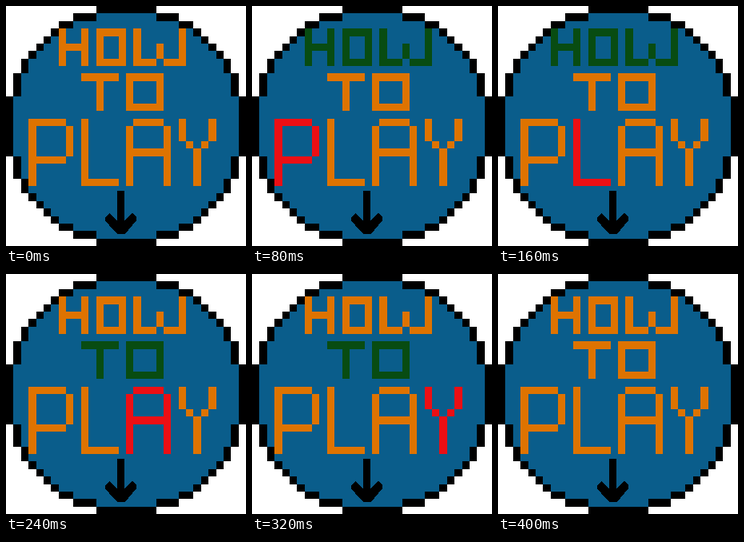
Recreate the animation shown at these times as an HTML page. Size 300 by 300 pixels, loop 480 ms.

```html
<!DOCTYPE html>
<html lang="en">
<head>
<meta charset="utf-8">
<title>How to play</title>
<style>
  html, body { margin: 0; height: 100%; overflow: hidden; background: #fff; }
  svg { display: block; width: 100vw; height: 100vh; shape-rendering: crispEdges; }
  .ink { fill: none; stroke-width: 1; stroke-linecap: square; stroke-linejoin: miter; }
  .ink path { stroke: #de7300; animation: 480ms step-end infinite; }
  .ink .how { animation-name: how; }
  .ink .to { animation-name: to; }
  .ink .p { animation-name: p; }
  .ink .l { animation-name: l; }
  .ink .a { animation-name: a; }
  .ink .y { animation-name: y; }
  @keyframes how { 16.6667% { stroke: #084c12; } 50% { stroke: #de7300; } }
  @keyframes to { 50% { stroke: #084c12; } 83.3333% { stroke: #de7300; } }
  @keyframes p { 16.6667% { stroke: #ec0f14; } 33.3333% { stroke: #de7300; } }
  @keyframes l { 33.3333% { stroke: #ec0f14; } 50% { stroke: #de7300; } }
  @keyframes a { 50% { stroke: #ec0f14; } 66.6667% { stroke: #de7300; } }
  @keyframes y { 66.6667% { stroke: #ec0f14; } 83.3333% { stroke: #de7300; } }
</style>
</head>
<body>
<svg viewBox="0 0 300 300" role="img" aria-label="How to play">
  <g transform="scale(9.375)">
    <!-- stepped disc: rim, then face -->
    <path d="M12 0H20V1H23V2H25V3H26V4H27V5H28V6H29V7H30V9H31V12H32V20H31V23H30V25H29V26H28V27H27V28H26V29H25V30H23V31H20V32H12V31H9V30H7V29H6V28H5V27H4V26H3V25H2V23H1V20H0V12H1V9H2V7H3V6H4V5H5V4H6V3H7V2H9V1H12Z"/>
    <path fill="#0a5d8b" d="M12 1H20V2H23V3H25V4H26V5H27V6H28V7H29V9H30V12H31V20H30V23H29V25H28V26H27V27H26V28H25V29H23V30H20V31H12V30H9V29H7V28H6V27H5V26H4V25H3V23H2V20H1V12H2V9H3V7H4V6H5V5H6V4H7V3H9V2H12Z"/>
    <!-- letters, stroked through cell centres -->
    <g class="ink" transform="translate(.5 .5)">
      <path class="how" d="M7 3V7M10 3V7M7 5H10M12 3H15V7H12ZM17 3V7H19M20 5V6M21 7H23V3"/>
      <path class="to" d="M10 9H14M12 9V13M16 9H20V13H16Z"/>
      <path class="p" d="M3 23V15H7M8 16V19M3 20H7"/>
      <path class="l" d="M10 15V23H14"/>
      <path class="a" d="M17 15H20M16 16V23M21 16V23M16 19H21"/>
      <path class="y" d="M23 15V17M27 15V17M24 18h0M26 18h0M25 19V23"/>
    </g>
  </g>
  <path d="M139 231H148V268L158 259L163 264V268L153 280L148 285H139L134 280L124 268V264L129 259L139 268Z"/>
</svg>
</body>
</html>
```
